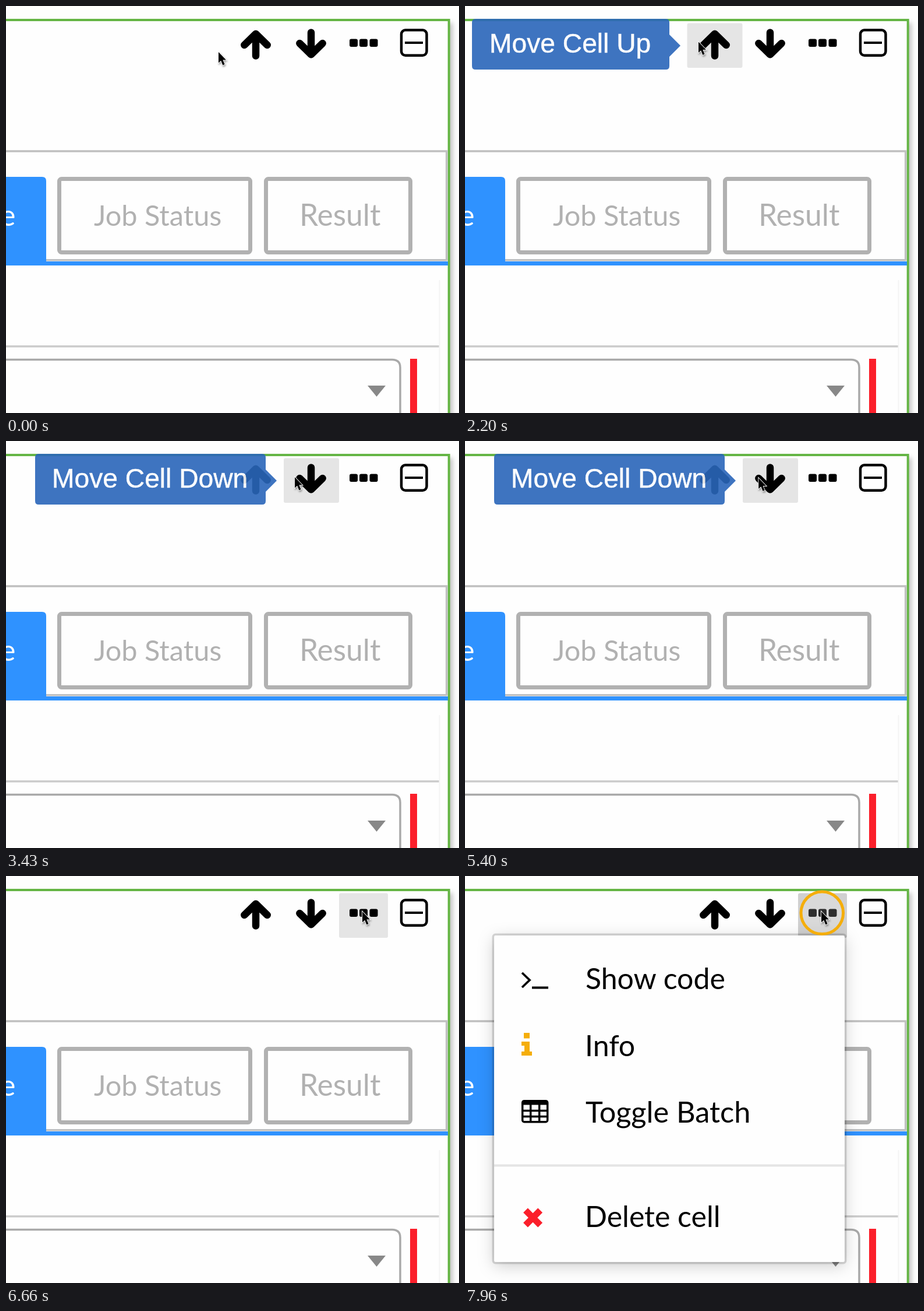
Write an HTML page that moves like this. It is 778 by 698 pixels and loops after 8000 ms.

```html
<!DOCTYPE html>
<html lang="en">
<head>
<meta charset="utf-8">
<title>Cell toolbar</title>
<style>
html, body { margin: 0; width: 100%; height: 100%; overflow: hidden; background: #fefefe; }
svg { display: block; width: 778px; height: 698px; }
text { font: 50px Lato, "Open Sans", sans-serif; }
.tip { fill: #2a66ba; }
.tip text { font: 46.2px "Liberation Sans", Arial, sans-serif; fill: #fff; stroke: #fff; stroke-width: .5; }
.panel { filter: drop-shadow(4px 7px 4px rgba(0,0,0,.25)); }
.sheet { filter: drop-shadow(0 6px 14px rgba(0,0,0,.2)); }
#cursor { filter: drop-shadow(1px 2px 1.5px rgba(0,0,0,.4)); }
.line { fill: none; stroke: #c0c0c0; stroke-width: 3.5; }
</style>
</head>
<body>
<svg viewBox="0 0 778 698">
  <rect class="panel" x="-40" y="24" width="800.7" height="760" fill="#fefefe" stroke="#65b545" stroke-width="4"/>

  <!-- tabs -->
  <path class="line" d="M0 249H756.7V437M69 435.7H757"/>
  <path d="M0 293H62Q69 293 69 300V438H759V445H0Z" fill="#2f92ff"/>
  <g fill="none" stroke="#b1b1b1" stroke-width="7">
    <rect x="91.5" y="296.5" width="328" height="126" rx="4"/>
    <rect x="446.5" y="296.5" width="248" height="126" rx="4"/>
  </g>
  <text x="-10" y="377" fill="#fff">e</text>
  <g fill="#b1b1b1">
    <text x="151" y="377" style="font-size:48.7px">Job Status</text>
    <text x="504" y="377" style="font-size:51.5px">Result</text>
  </g>

  <!-- form -->
  <path class="line" d="M0 583.7H744" style="stroke:#ccc"/>
  <path d="M744.5 470V698" stroke="#f4f4f4" stroke-width="2"/>
  <path class="line" d="M0 606.5H663Q677 606.5 677 620V698" style="stroke:#a9a9a9"/>
  <path d="M621 651H652L636.5 670Z" fill="#888"/>
  <path d="M694 605H706V698H694Z" fill="#fb1f2b"/>

  <!-- toolbar -->
  <g fill="#e5e5e5">
    <rect class="hover" x="381.5" y="29.5" width="95" height="76.5" rx="3"/>
    <rect class="hover" x="477" y="29.5" width="95" height="76.5" rx="3"/>
    <rect class="hover" x="572" y="29.5" width="84" height="76.5" rx="3"/>
  </g>
  <g id="arrow" fill="none" stroke="#000" stroke-width="12.5" stroke-linecap="round" stroke-linejoin="round">
    <path d="M409.3 67L429 47.8L448.7 67M429 50V85.5"/>
  </g>
  <use href="#arrow" transform="matrix(1 0 0 -1 95 131)"/>
  <rect x="590" y="56.5" width="14" height="13.5" rx="3"/>
  <rect x="607" y="56.5" width="14" height="13.5" rx="3"/>
  <rect x="624.5" y="56.5" width="14" height="13.5" rx="3"/>
  <rect x="679" y="41.3" width="43.5" height="43.5" rx="7" fill="none" stroke="#000" stroke-width="4.5"/>
  <path d="M685 63H716" stroke="#000" stroke-width="4"/>

  <!-- tooltips -->
  <g class="tip">
    <path d="M18 22H345Q351 22 351 28V49L370 68L351 87V103Q351 109 345 109H18Q12 109 12 103V28Q12 22 18 22Z"/>
    <text x="42" y="80">Move Cell Up</text>
  </g>
  <g class="tip">
    <path d="M56 22H440Q446 22 446 28V49L465 68L446 87V103Q446 109 440 109H56Q50 109 50 103V28Q50 22 56 22Z"/>
    <text x="79" y="80">Move Cell Down</text>
  </g>

  <g id="menu">
    <rect class="sheet" x="50" y="102" width="602" height="560" rx="3" fill="#fefefe"/>
    <rect x="48.3" y="100.3" width="605.4" height="563.4" rx="4" fill="none" stroke="#000" stroke-opacity=".15" stroke-width="3.5"/>
    <path d="M50 496.5H652" stroke="#e5e5e5" stroke-width="4"/>
    <text x="207" y="194">Show code</text>
    <text x="206" y="308.5">Info</text>
    <text x="207" y="422.5" style="font-size:50.5px">Toggle Batch</text>
    <text x="206" y="602">Delete cell</text>
    <path d="M98 166L111 178.5L98 191M115 191.5H143" fill="none" stroke="#000" stroke-width="3.8"/>
    <path d="M101 269H111V278.5H101ZM97 284H111V301H115V308H97V301H102V291H97Z" fill="#f5ae0b"/>
    <g fill="none" stroke="#000" stroke-width="3.5">
      <rect x="98.7" y="385.7" width="43" height="36" rx="3"/>
      <path d="M98 389H142" stroke-width="7"/>
      <path d="M98 402.5H142M98 412.5H142M112.7 390V422M127.7 390V422"/>
    </g>
    <path d="M104 573.4L129.2 598.6M129.2 573.4L104 598.6" stroke="#fb1f2b" stroke-width="11"/>
  </g>

  <circle id="click" cx="613.3" cy="63.3" fill="#fff" fill-opacity=".18" stroke="#f5ae0b" stroke-width="5"/>
  <path id="cursor" d="M0 0V18.5L4.2 14.8L7.3 22.5L10.6 21L7.4 13.6H13Z" stroke="#fff" stroke-width="1.8" paint-order="stroke"/>
</svg>
<script>
const $ = id => document.getElementById(id);
const hovers = document.querySelectorAll('.hover');
const tips = document.querySelectorAll('.tip');

const ramp = (t, a, b) => Math.min(1, Math.max(0, (t - a) / (b - a)));
const smooth = u => u * u * (3 - 2 * u);
const easeOut = u => 1 - (1 - u) ** 2;
const fade = (t, inAt, inEnd, outAt, outEnd) =>
  easeOut(ramp(t, inAt, inEnd)) * (1 - easeOut(ramp(t, outAt, outEnd)));

// start, end, from, to, easing
const moves = [
  [200, 730, [365, 79], [401, 61.5], smooth],
  [2200, 3000, [401, 61.5], [478, 64], smooth],
  [3030, 3430, [478, 64], [496, 62], easeOut],
  [5400, 6130, [504, 63.5], [583, 61], easeOut],
  [6230, 6660, [583, 61], [612, 61], smooth]
];

function draw() {
  const t = performance.now() % 8000;
  const [a, b, from, to, ease] = moves.findLast(m => t >= m[0]) || moves[0];
  const u = ease(ramp(t, a, b));
  const [x, y] = from.map((v, i) => v + (to[i] - v) * u);
  $('cursor').setAttribute('transform', `translate(${x} ${y})`);

  const active = [430, 3000, 5850].findLastIndex(start => t >= start);
  hovers.forEach((h, i) => h.style.opacity = i === active ? 1 : 0);
  hovers[2].style.fill = t >= 7460 ? '#d0d0d0' : '';

  tips[0].style.opacity = .9 * fade(t, 430, 730, 3000, 3200);
  tips[1].style.opacity = .9 * fade(t, 3130, 3430, 5830, 6130);

  const press = easeOut(ramp(t, 7440, 7660));
  $('click').style.opacity = press;
  $('click').setAttribute('r', 20 + 16.3 * press);
  $('menu').style.opacity = easeOut(ramp(t, 7660, 7940));
  requestAnimationFrame(draw);
}
draw();
</script>
</body>
</html>
```
